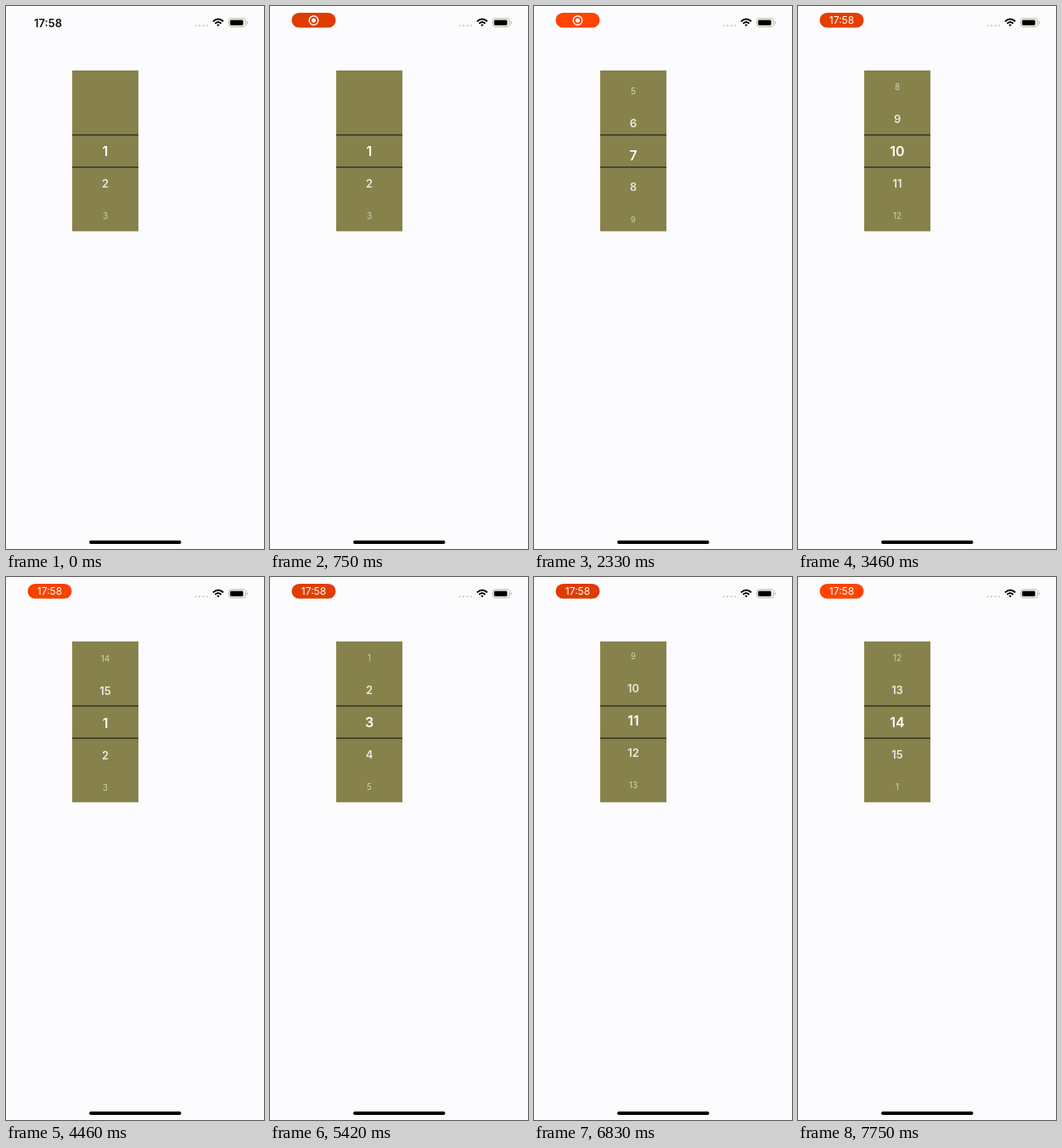
Animation of 304x640 px, one loop 7790 ms. Source, as an HTML page:

```html
<!DOCTYPE html>
<html lang="en">
<head>
<meta charset="utf-8">
<title>Looping number picker</title>
<style>
  html, body { margin: 0; width: 100%; height: 100%; overflow: hidden; background: #fcfcfe; }
  svg { display: block; width: 100vw; height: 100vh; }
  text { font-family: Inter, Roboto, sans-serif; text-anchor: middle; }
</style>
</head>
<body>
<svg viewBox="0 0 304 640">
  <defs>
    <clipPath id="window"><rect x="78" y="76" width="78" height="189.5"/></clipPath>
  </defs>
  <rect id="screen" width="304" height="640" fill="#fcfcfe"/>

  <text id="clock" x="49.5" y="24.6" font-size="13" font-weight="600" fill="#111">17:58</text>
  <g id="pill">
    <rect id="pillShape" x="25.5" y="8" width="52" height="17.5" rx="8.75"/>
    <g id="recordIcon" fill="#fff">
      <circle cx="51.5" cy="17" r="5.3" fill="none" stroke="#fff" stroke-width="1.4"/>
      <circle cx="51.5" cy="17" r="2.5"/>
    </g>
    <text id="pillClock" x="51.5" y="21.2" font-size="12" fill="#fff">17:58</text>
  </g>

  <g fill="#c9c7a0">
    <circle cx="223.5" cy="23" r="1.1"/><circle cx="228" cy="23" r="1.1"/>
    <circle cx="232.5" cy="23" r="1.1"/><circle cx="237" cy="23" r="1.1"/>
  </g>
  <g fill="none" stroke="#000" stroke-width="1.9">
    <path d="M244 18.2Q250 12.8 256 18.2"/>
    <path d="M246.4 20.7Q250 17.5 253.6 20.7"/>
    <path d="M248.3 22.2Q250 20.9 251.7 22.2L250 24.1Z" fill="#000" stroke="none"/>
  </g>
  <rect x="262.5" y="14.8" width="20" height="9.6" rx="2.8" fill="none" stroke="#b5b598"/>
  <rect x="264.1" y="16.4" width="15.4" height="6.4" rx="1.4"/>
  <path d="M284 18v3.2q1.2-.4 1.2-1.6t-1.2-1.6" fill="#b5b598"/>

  <rect x="78" y="76" width="78" height="189.5" fill="#87824b"/>
  <g id="wheel" clip-path="url(#window)" fill="#fff"></g>
  <path d="M78 152H156M78 190H156" stroke="#33352b" stroke-width="1.3"/>
  <rect x="98" y="630" width="108.5" height="4" rx="2"/>
</svg>
<script>
const LOOP = 7790, COUNT = 15, ROW = 38, CENTER_Y = 171;
const PILL_AT = 350, CLOCK_AT = 3000;
// Each flick: start time, end time, first row, last row
const flicks = [
  [1100, 2630, 1, 7],
  [2680, 3420, 7, 10],
  [3500, 5380, 10, 18],
  [5450, 6790, 18, 26],
  [6805, 7710, 26, 29]
];
const $ = id => document.getElementById(id);
const clamp = v => Math.max(0, Math.min(1, v));
const flickEase = u => 1 - (1 - u ** 1.5) ** 3;
const show = (id, on) => $(id).setAttribute('visibility', on ? 'visible' : 'hidden');

const rows = Array.from({ length: 7 }, () => {
  const label = document.createElementNS('http://www.w3.org/2000/svg', 'text');
  label.setAttribute('x', 117);
  return $('wheel').appendChild(label);
});

function wheelPosition(t) {
  let position = 1;
  for (const [start, end, from, to] of flicks) {
    if (t >= start) position = from + (to - from) * flickEase(clamp((t - start) / (end - start)));
  }
  return position;
}

function drawWheel(position) {
  const first = Math.round(position) - 3;
  rows.forEach((label, i) => {
    const index = first + i;
    const offset = index - position;
    const distance = Math.abs(offset);
    const size = Math.max(7, 16 - 3.1 * distance);
    label.textContent = index < 1 ? '' : (index - 1) % COUNT + 1;
    label.setAttribute('y', CENTER_Y + offset * ROW + size * 0.36);
    label.setAttribute('font-size', size);
    label.setAttribute('font-weight', distance < 1.5 ? 600 : 400);
    label.setAttribute('opacity', clamp(1 - 0.15 * distance - 0.02 * distance ** 2));
  });
}

function drawStatus(t) {
  const recording = t >= PILL_AT, timed = t >= CLOCK_AT;
  show('clock', !recording);
  show('pillShape', recording);
  show('recordIcon', recording && !timed);
  show('pillClock', timed);
  const glow = clamp(0.5 + Math.cos((t - 2040) / 2000 * 2 * Math.PI));
  $('pillShape').setAttribute('fill', `rgb(${222 + 33 * glow}, ${60 + 8 * glow}, 0)`);
}

function render(t) {
  drawWheel(wheelPosition(t));
  drawStatus(t);
}

const began = performance.now();
function frame() {
  render((performance.now() - began) % LOOP);
  requestAnimationFrame(frame);
}
render(0);
requestAnimationFrame(frame);
</script>
</body>
</html>
```
